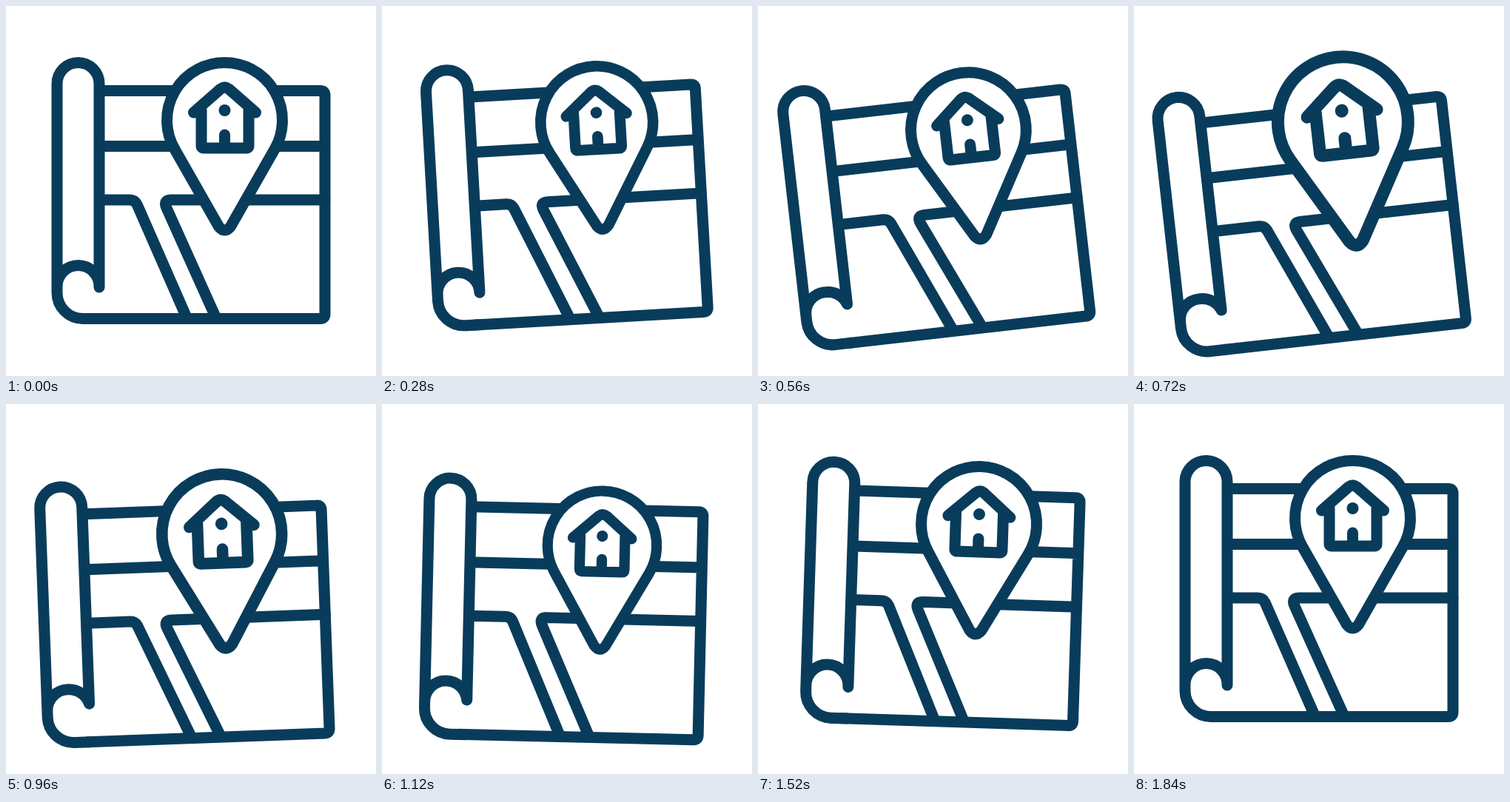
These frames come from a looping animation (500 px wide and 500 px high, 2000 ms). An HTML page:

```html
<!DOCTYPE html>
<html lang="en">
<head>
<meta charset="utf-8">
<title>Map with house pin</title>
<style>
  html, body { margin: 0; width: 100%; height: 100%; overflow: hidden; background: #fff; }
  svg { display: block; width: 100%; height: 100%; }
  .line { fill: none; stroke: #093c5b; stroke-width: 15; stroke-linecap: round; stroke-linejoin: round; }
  .paper { fill: #fff; }
</style>
</head>
<body>
<svg viewBox="0 0 500 500">
  <g id="map" class="line">
    <path d="M104 114.5H425Q431 114.5 431 120.500V416.500Q431 422.500 425 422.500H104M104 189.500H431"/>
    <path d="M104 262H167Q174 262 177 268L244.500 422M431 262H223Q212 262 217 273L284 422"/>
    <path id="roll" class="paper"/>
    <g id="pin">
      <path class="paper" d="M287.500 298L227.700 193A78 78 0 1 1 363.300 193L303.500 298Q295.500 308 287.500 298Z"/>
      <path d="M253.500 144L290 112Q295.500 108 301 112L337.500 144"/>
      <path d="M264 140V189Q264 192 267 192H325Q328 192 328 189V140M295.500 174V190"/>
      <circle cx="295.500" cy="141" r="8" fill="#093c5b" stroke="none"/>
    </g>
  </g>
</svg>
<script>
const LOOP = 2000, STEP = 40;
const [map, roll, pin] = ['map', 'roll', 'pin'].map(id => document.getElementById(id));

// Eased progress from 0 to 1 between two times.
function ease(t, from, to) {
  const p = Math.min(1, Math.max(0, (t - from) / (to - from)));
  return p * p * (3 - 2 * p);
}

// The lip of the curl rises as the roll moves out to the left.
function rollPath(out) {
  const lip = 380 - out / 2;
  return `M69 379a28.5 28.5 0 0 1 28.5-28.5A28.5 28.5 0 0 1 126 ${lip}` +
    'V105a28.5 28.5 0 0 0-57 0V387.5a35 35 0 0 0 35 35H126';
}

function draw(now) {
  const t = Math.floor(now % LOOP / STEP) * STEP;
  const tilt = -6.5 * ease(t, 80, 480) + 9 * ease(t, 680, 1250) - 2.5 * ease(t, 1360, 1840);
  const drop = 29 * (ease(t, 205, 830) - ease(t, 1010, 1745));
  const out = 22 * (ease(t, 210, 640) - ease(t, 819, 1340));
  const size = 1 - 0.05 * ease(t, 90, 460) + 0.187 * ease(t, 460, 760)
    - 0.197 * ease(t, 760, 1160) + 0.06 * ease(t, 1160, 1490);

  map.setAttribute('transform', `translate(0 ${drop}) rotate(${tilt} 250 250)`);
  roll.setAttribute('transform', `translate(${-out} 0)`);
  roll.setAttribute('d', rollPath(out));
  pin.setAttribute('transform', `translate(295.5 311) scale(${size}) translate(-295.5 -311)`);
}

const start = performance.now();
function tick() {
  draw(performance.now() - start);
  requestAnimationFrame(tick);
}
tick();
</script>
</body>
</html>
```
